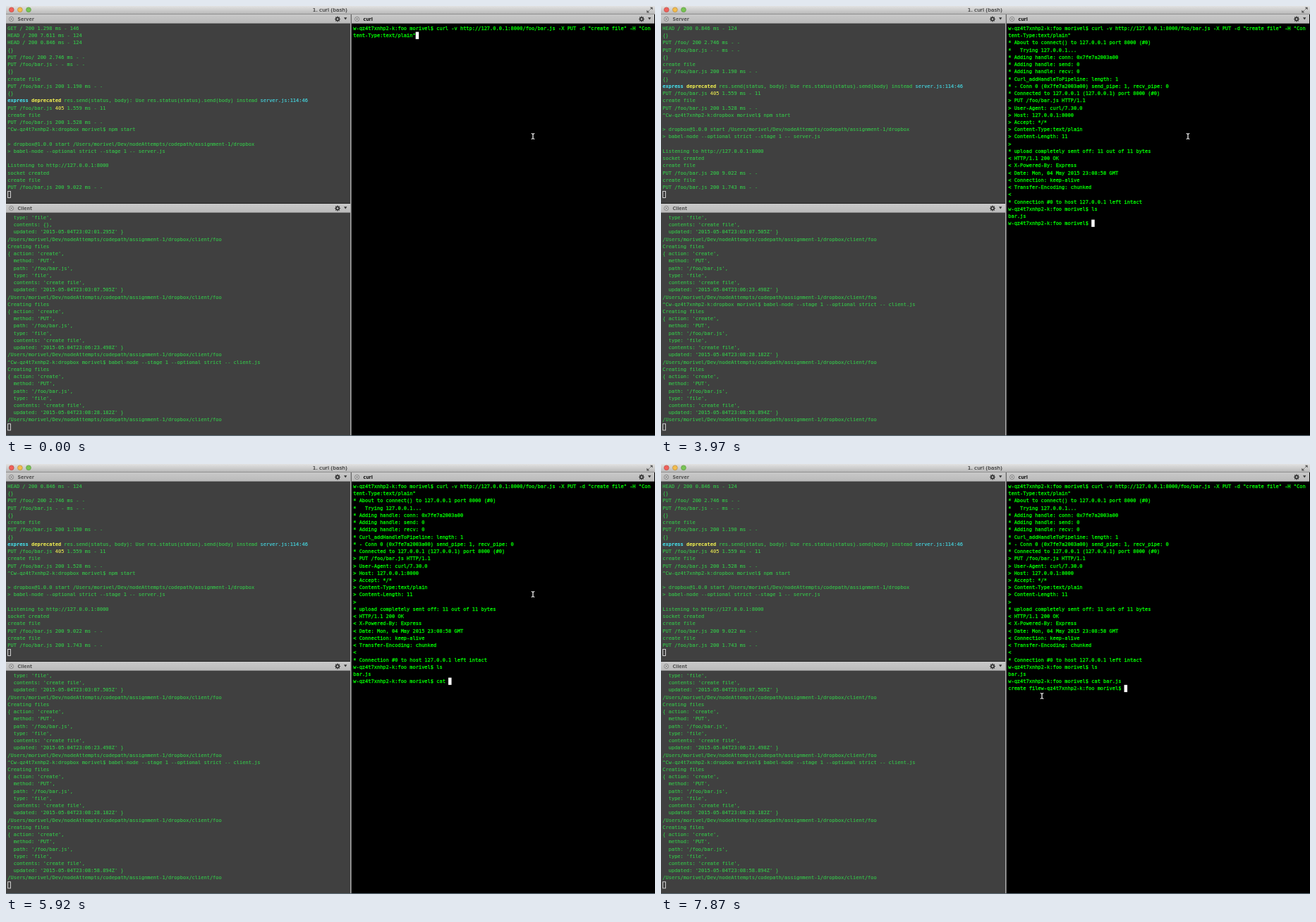
Recreate the animation shown at these times as an HTML page with a canvas. Size 920 px wide and 609 px high, loop 8 s.

```html
<!DOCTYPE html>
<html lang="en">
<head>
<meta charset="utf-8">
<title>Terminal session</title>
<style>
  html, body { margin: 0; width: 100%; height: 100%; overflow: hidden; background: #000; }
  canvas { display: block; }
</style>
</head>
<body>
<canvas id="stage" width="920" height="609"></canvas>
<script>
const ctx = document.getElementById('stage').getContext('2d');
const LOOP = 8000, FONT = 7, CELL = FONT * 0.602, ROW = 10.23;
const MONO = '"DejaVu Sans Mono", monospace', SANS = '"DejaVu Sans", sans-serif';
const DIM = '#35c64a', BRIGHT = '#00f000', CYAN = '#45dce6', YELLOW = '#e6e650';
const HOST = 'w-qz4t7xnhp2-k', USER = 'morivel';
const HOME = `/Users/${USER}/Dev/nodeAttempts/codepath/assignment-1/dropbox`;
const PROMPT = `${HOST}:foo ${USER}$ `;

// A line is a string, or a list of [text, colour, weight] parts.
const serverLog = [
  'GET / 200 1.298 ms - 146',
  'HEAD / 200 7.611 ms - 124',
  'HEAD / 200 0.846 ms - 124',
  '{}',
  'PUT /foo/ 200 2.746 ms - -',
  'PUT /foo/bar.js - - ms - -',
  '{}',
  'create file',
  'PUT /foo/bar.js 200 1.190 ms - -',
  '{}',
  [['express ', CYAN, 'bold'], ['deprecated ', YELLOW, 'bold'],
   ['res.send(status, body): Use res.status(status).send(body) instead '], ['server.js:114:46', CYAN]],
  [['PUT /foo/bar.js '], ['405', YELLOW], [' 1.559 ms - 11']],
  'create file',
  'PUT /foo/bar.js 200 1.528 ms - -',
  `^C${HOST}:dropbox ${USER}$ npm start`,
  '',
  `> dropbox@1.0.0 start ${HOME}`,
  '> babel-node --optional strict --stage 1 -- server.js',
  '',
  'Listening to http://127.0.0.1:8000',
  'socket created',
  'create file',
  'PUT /foo/bar.js 200 9.022 ms - -',
  'create file',
  'PUT /foo/bar.js 200 1.743 ms - -'
];

const created = (time, contents = "'create file'") => [
  'Creating files',
  "{ action: 'create',",
  "  method: 'PUT',",
  "  path: '/foo/bar.js',",
  "  type: 'file',",
  `  contents: ${contents},`,
  `  updated: '2015-05-04T23:${time}Z' }`,
  `${HOME}/client/foo`
];
const clientLog = [
  ...created('02:01.295', '{}').slice(4),
  ...created('03:07.505'),
  ...created('06:23.498'),
  `^C${HOST}:dropbox ${USER}$ babel-node --stage 1 --optional strict -- client.js`,
  ...created('08:28.182'),
  ...created('08:58.894')
];

const command = `${PROMPT}curl -v http://127.0.0.1:8000/foo/bar.js -X PUT -d "create file" -H "Con
tent-Type:text/plain"`;
const response = `${command}
* About to connect() to 127.0.0.1 port 8000 (#0)
*   Trying 127.0.0.1...
* Adding handle: conn: 0x7fe7a2003a00
* Adding handle: send: 0
* Adding handle: recv: 0
* Curl_addHandleToPipeline: length: 1
* - Conn 0 (0x7fe7a2003a00) send_pipe: 1, recv_pipe: 0
* Connected to 127.0.0.1 (127.0.0.1) port 8000 (#0)
> PUT /foo/bar.js HTTP/1.1
> User-Agent: curl/7.30.0
> Host: 127.0.0.1:8000
> Accept: */*
> Content-Type:text/plain
> Content-Length: 11
>
* upload completely sent off: 11 out of 11 bytes
< HTTP/1.1 200 OK
< X-Powered-By: Express
< Date: Mon, 04 May 2015 23:08:58 GMT
< Connection: keep-alive
< Transfer-Encoding: chunked
<
* Connection #0 to host 127.0.0.1 left intact
${PROMPT}`;
const listed = `${response}ls\nbar.js\n${PROMPT}`;

const shell = [
  [0, command], [500, response], [3670, response + 'l'], [3820, response + 'ls'],
  [3970, listed], [4420, listed + 'c'], [4570, listed + 'ca'], [4720, listed + 'cat'],
  [5020, listed + 'cat '], [5320, listed + 'cat f'], [5920, listed + 'cat '],
  [6070, listed + 'cat b'], [6220, listed + 'cat ba'], [6370, listed + 'cat bar'],
  [6520, listed + 'cat bar.js '], [6970, `${listed}cat bar.js\ncreate file${PROMPT}`]
];
const pointer = [
  [0, [747, 184.5]], [7420, [662.5, 233.5]], [7570, [614.5, 233.5]],
  [7720, [570.5, 334]], [7870, [540, 328.5]]
];
const stateAt = (steps, t) => steps.filter(([start]) => start <= t).pop()[1];

function rect(x, y, w, h, color) {
  ctx.fillStyle = color;
  ctx.fillRect(x, y, w, h);
}

function shade(x, y, w, h, top, bottom) {
  const fill = ctx.createLinearGradient(0, y, 0, y + h);
  fill.addColorStop(0, top);
  fill.addColorStop(1, bottom);
  rect(x, y, w, h, fill);
}

// Text is laid out at ten times its size so that advances stay fractional.
// "smooth" thickens the strokes the way desktop font smoothing does.
function text(str, x, y, color, { size = FONT, family = MONO, weight = 'normal', smooth = 0 } = {}) {
  ctx.save();
  ctx.translate(x, y);
  ctx.scale(0.1, 0.1);
  ctx.font = `${weight} ${size * 10}px ${family}`;
  ctx.fillStyle = ctx.strokeStyle = color;
  ctx.fillText(str, 0, 0);
  if (smooth) {
    ctx.lineWidth = smooth * 10;
    ctx.lineJoin = 'round';
    ctx.strokeText(str, 0, 0);
  }
  ctx.restore();
}

function printLines(lines, x, top, color, smooth) {
  lines.forEach((line, row) => {
    let column = 0;
    for (const [str, tint = color, weight] of Array.isArray(line) ? line : [[line]]) {
      text(str, x + column * CELL, top + row * ROW + 7.6, tint, { weight, smooth });
      column += str.length;
    }
  });
}

function disc(x, y, r, fill, stroke) {
  ctx.beginPath();
  ctx.arc(x, y, r, 0, Math.PI * 2);
  ctx.fillStyle = fill;
  ctx.fill();
  if (stroke) strokePath(stroke, 0.7);
}

function strokePath(color, width) {
  ctx.strokeStyle = color;
  ctx.lineWidth = width;
  ctx.stroke();
}

function lines(color, width, ...segments) {
  ctx.beginPath();
  for (const [x1, y1, x2, y2] of segments) {
    ctx.moveTo(x1, y1);
    ctx.lineTo(x2, y2);
  }
  strokePath(color, width);
}

function triangle(color, ...points) {
  ctx.beginPath();
  points.forEach(([x, y]) => ctx.lineTo(x, y));
  ctx.fillStyle = color;
  ctx.fill();
}

function gear(x, y) {
  const teeth = [0, 1, 2, 3].map(i => {
    const dx = 4 * Math.cos(i * Math.PI / 4), dy = 4 * Math.sin(i * Math.PI / 4);
    return [x - dx, y - dy, x + dx, y + dy];
  });
  lines('#333', 1.2, ...teeth);
  disc(x, y, 2.9, '#333');
  disc(x, y, 1.2, '#c4c4c4');
}

function paneHeader(x, y, w, title, color) {
  shade(x, y, w, 13, '#c9c9c9', '#b9b9b9');
  rect(x, y + 12.3, w, 0.7, '#777');
  const cx = x + 7.6, cy = y + 6.5;
  disc(cx, cy, 3.1, '#d2d2d2', '#666');
  lines('#555', 0.8, [cx - 1.3, cy - 1.3, cx + 1.3, cy + 1.3], [cx - 1.3, cy + 1.3, cx + 1.3, cy - 1.3]);
  text(title, x + 16.4, y + 9, color, { size: 6.3, family: SANS, weight: 'bold' });
  const right = x + w;
  gear(right - 18, cy);
  triangle('#333', [right - 9, y + 4.3], [right - 4.6, y + 4.3], [right - 6.8, y + 7.6]);
}

function windowChrome() {
  shade(0, 0, 920, 12, '#e2e2e2', '#b6b6b6');
  rect(0, 11.4, 920, 0.6, '#777');
  [['#f0605a', '#b8504a'], ['#f3bd4e', '#b88c3e'], ['#78c454', '#5c9844']]
    .forEach(([fill, edge], i) => disc(7.8 + 12.1 * i, 5.3, 3.4, fill, edge));
  text('1. curl (bash)', 434.7, 8, '#333', { size: 7.4, family: SANS, smooth: 0.15 });
  triangle('#555', [912.8, 1.8], [916.6, 1.8], [916.6, 5.6]);
  triangle('#555', [908.3, 5.8], [908.3, 9.6], [912.1, 9.6]);
  lines('#555', 0.9, [912.9, 5.2, 915.4, 2.7], [909.5, 8.7, 912, 6.2]);
}

function hollowCursor(row, top) {
  ctx.strokeStyle = '#ddd';
  ctx.lineWidth = 0.9;
  ctx.strokeRect(2.6, top + row * ROW + 0.7, CELL - 0.3, 9.1);
}

function beam([x, y]) {
  lines('#fff', 1.2, [x, y - 3.5, x, y + 3.5], [x - 2.2, y - 4, x - 0.4, y - 3.4], [x + 0.4, y - 3.4, x + 2.2, y - 4],
    [x - 2.2, y + 4, x - 0.4, y + 3.4], [x + 0.4, y + 3.4, x + 2.2, y + 4]);
}

function draw(t) {
  const sent = t >= 500;
  rect(0, 0, 920, 609, '#000');
  windowChrome();

  rect(0, 25, 488, 583, '#404040');
  paneHeader(0, 12, 488, 'Server', '#555');
  const serverStart = sent ? 2 : 0;
  printLines(serverLog.slice(serverStart, serverStart + 23), 2.3, 26.4, DIM, 0.12);
  hollowCursor(23, 26.4);

  rect(0, 279, 488, 1, '#222');
  paneHeader(0, 280, 488, 'Client', '#555');
  const clientStart = sent ? 8 : 0;
  printLines(clientLog.slice(clientStart, clientStart + 29), 2.3, 294.4, DIM, 0.12);
  hollowCursor(29, 294.4);

  paneHeader(490, 12, 429, 'curl', '#111');
  rect(488, 12, 1.6, 596, '#aaa');
  const screen = stateAt(shell, t).split('\n');
  printLines(screen, 492.2, 26.4, BRIGHT, 0.32);
  const row = screen.length - 1;
  rect(492.2 + screen[row].length * CELL, 26.4 + row * ROW, CELL + 0.3, ROW, '#fff');
  rect(0, 608, 920, 1, '#62717c');
  beam(stateAt(pointer, t));
}

function tick() {
  draw(performance.now() % LOOP);
  requestAnimationFrame(tick);
}
tick();
</script>
</body>
</html>
```
